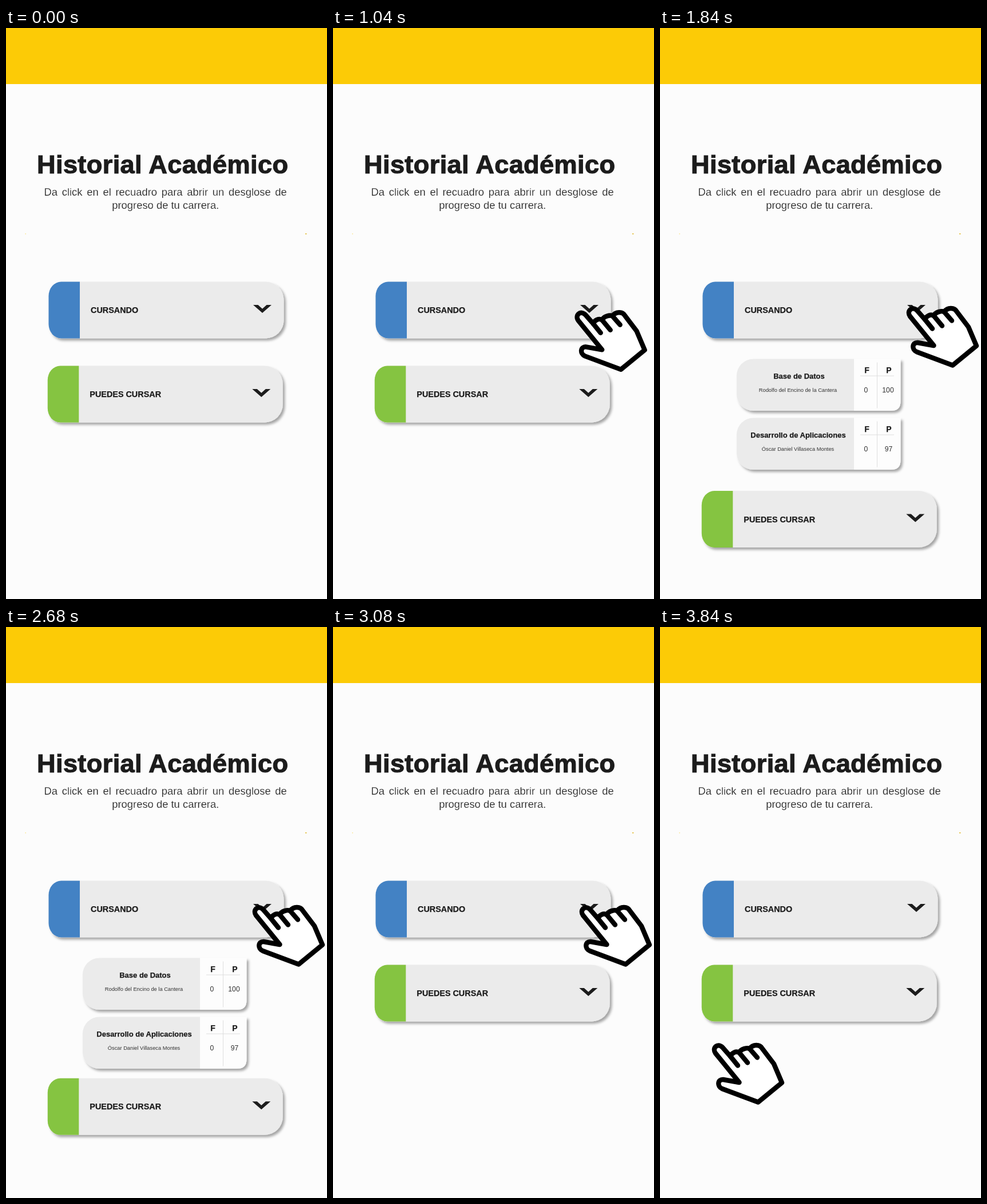
An HTML page for the animation above (4000 ms loop, 561 px wide and 998 px high).

```html
<!DOCTYPE html>
<html lang="es">
<head>
<meta charset="utf-8">
<title>Historial Académico</title>
<style>
  html, body { margin: 0; width: 100%; height: 100%; overflow: hidden; background: #fcfcfc; }
  svg { display: block; width: 100%; height: 100%; }
  text { font-family: "Liberation Sans", Arial, sans-serif; fill: #1c1c1c; }
  .bold { font-weight: bold; stroke: #1c1c1c; stroke-width: .25; }
  .mid { text-anchor: middle; }
  .title { font-size: 45.2px; letter-spacing: .35px; stroke-width: 1.1; }
  .lead { font-size: 18.4px; stroke: #fcfcfc; stroke-width: .25; }
  .label { font-size: 14.4px; }
  .course { font-size: 13px; }
  .person { font-size: 9.3px; fill: #333; }
  .head { font-size: 14px; }
  .num { font-size: 12.2px; fill: #333; }
</style>
</head>
<body>
<svg id="stage" viewBox="0 0 561 998">
  <defs>
    <filter id="shadow" x="-5%" y="-10%" width="112%" height="130%">
      <feDropShadow dx="3.5" dy="3.8" stdDeviation="2" flood-color="#000" flood-opacity=".35"/>
    </filter>
  </defs>
  <rect width="561" height="998" fill="#fcfcfc"/>
  <rect width="561" height="98" fill="#fccb06"/>
  <text class="bold title" x="54" y="254">Historial Académico</text>
  <text class="lead" x="66.5" y="293" word-spacing="2.62">Da click en el recuadro para abrir un desglose de</text>
  <text class="lead mid" x="278.8" y="316">progreso de tu carrera.</text>
  <rect x="33.5" y="359" width="1.5" height="1.5" fill="#fbe48a"/>
  <rect x="523" y="359" width="2.5" height="1.5" fill="#e0b72a"/>
  <g id="scene"></g>
  <g id="hand" fill="#fff" stroke="#000" stroke-width="8.4" stroke-linejoin="round" stroke-linecap="round">
    <path d="M33 25 L19 9 C10 0 0 10 6.500 19 L48 70 L20 65 C10 64 9 77 18 81
             L81 104.5 L122.5 70.5 L108.500 37.500 L88 10.500 C84 3 72 3 66 11
             C62 9 51 11 48 18 C43 14.500 34 18 33 25 Z"/>
    <path fill="none" d="M33 25 L45.500 40.500 M48 18 L62.500 35.500 M66 11 L79.500 26.500"/>
  </g>
</svg>
<script>
const LOOP = 4000, STEP = 40;
const scene = document.getElementById('scene');
const hand = document.getElementById('hand');

function group(html) {
  const g = document.createElementNS('http://www.w3.org/2000/svg', 'g');
  g.innerHTML = html;
  scene.appendChild(g);
  return g;
}

const move = (el, x, y) => el.setAttribute('transform', `translate(${x} ${y})`);

function card(course, person, score, scoreX, nameX) {
  return group(`
    <g filter="url(#shadow)">
      <path d="M339 0H420.500V74Q420.500 90.500 404 90.500H339Z" fill="#fdfdfd"/>
      <path d="M339 0V90.500H163A29 29 0 0 1 134 61.500V29A29 29 0 0 1 163 0Z" fill="#ebebeb"/>
    </g>
    <path d="M379.500 6V86M350 29.500H409" stroke="#dedede"/>
    <text class="bold course mid" x="${nameX}" y="34">${course}</text>
    <text class="person mid" x="241" y="57">${person}</text>
    <text class="bold head mid" x="361.5" y="24.500">F</text>
    <text class="bold head mid" x="400" y="24.500">P</text>
    <text class="num mid" x="360" y="58">0</text>
    <text class="num mid" x="${scoreX}" y="58">${score}</text>`);
}

function panel(label, color) {
  const left = 'H22A22 25 0 0 1 0 74V25A22 25 0 0 1 22 0Z';
  return group(`
    <path filter="url(#shadow)" fill="#ebebeb"
      d="M22 0H379A32 32 0 0 1 411 32V67A32 32 0 0 1 379 99${left}"/>
    <path fill="${color}" d="M22 0H54.500V99${left}"/>
    <text class="bold label" x="73.500" y="54.500">${label}</text>
    <path fill="#1c1c1c" d="M357.500 40.500H366L373.500 47.300L381 40.500H389.500L373.500 54.500Z"/>`);
}

const cards = [
  { el: card('Base de Datos', 'Rodolfo del Encino de la Cantera', 100, 398.5, 243), y: 578.5 },
  { el: card('Desarrollo de Aplicaciones', 'Óscar Daniel Villaseca Montes', 97, 399.5, 241.5), y: 681.5 }
];
const next = panel('PUEDES CURSAR', '#85c441');
const current = panel('CURSANDO', '#4382c4');
move(current, 74.5, 443.5);

// Decelerating progress between two times
function glide(t, start, end) {
  const p = Math.min(1, Math.max(0, (t - start) / (end - start)));
  return 1 - Math.pow(1 - p, 1.6);
}

function draw(t) {
  const open = glide(t, 1385, 1840) - glide(t, 2655, 3080);
  move(next, 72.8, 590.5 + 218.5 * open);

  const shown = glide(t, 1476, 1840) - glide(t, 2700, 3080);
  for (const { el, y } of cards) {
    move(el, 0, 443.5 + (y - 443.5) * shown);
    el.style.display = shown > 0 ? '' : 'none';
  }

  const away = 1 - glide(t, 560, 1120);
  const leave = glide(t, 3280, 3840);
  move(hand, 430.5 - 186 * away - 340 * leave, 485 + 165 * away + 241 * leave);
  hand.style.display = t >= 560 ? '' : 'none';
}

const began = performance.now();
function tick() {
  const t = (performance.now() - began) % LOOP;
  draw(Math.floor(t / STEP) * STEP);
  requestAnimationFrame(tick);
}
tick();
</script>
</body>
</html>
```
